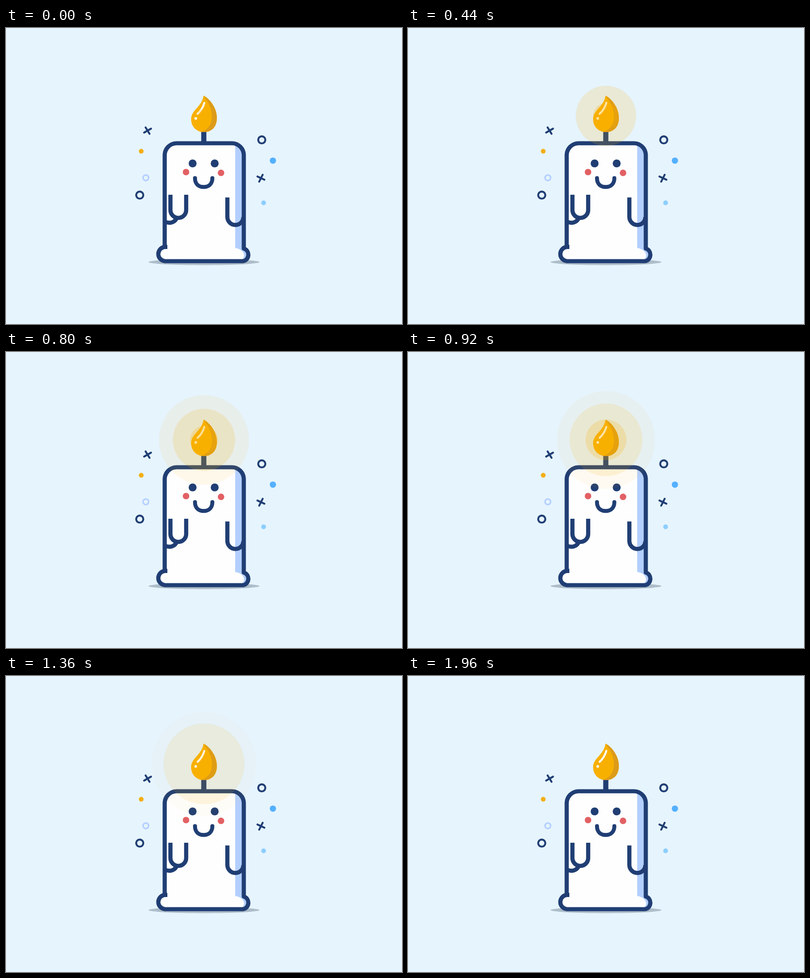
Animation of 800 by 600 pixels, one loop 2040 ms. Source, as an HTML page:

```html
<!DOCTYPE html>
<html lang="en">
<head>
<meta charset="utf-8">
<title>Candle</title>
<style>
  html, body { margin: 0; width: 100%; height: 100%; overflow: hidden; background: #e6f4fe; }
  svg { display: block; width: 100vw; height: 100vh; }
  .ink { fill: #203e74; }
  .line { fill: none; stroke: #203e74; stroke-width: 8.4; }
  .round { stroke-linecap: round; }
  .thin { stroke-width: 3.9; }
  .white { fill: #fefefe; }
  .shade { fill: #b3cfff; }
  .cheek { fill: #e26064; }

  .glow {
    fill: #f8b000;
    transform-origin: 400px 178px;
    transform: scale(0);
    opacity: 0;
    animation: grow 2040ms infinite backwards, fade 2040ms linear infinite backwards;
    animation-delay: var(--start);
  }
  /* Each ring lives for 1263 ms of the loop */
  @keyframes grow {
    0% { transform: scale(0); animation-timing-function: cubic-bezier(.333, .475, .667, .809); }
    61.9%, 100% { transform: scale(1); }
  }
  @keyframes fade {
    0% { opacity: .285; }
    61.9%, 100% { opacity: 0; }
  }
</style>
</head>
<body>
<svg viewBox="0 0 800 600">
  <ellipse cx="400" cy="474.5" rx="112" ry="6.2" fill="#adbdc9"/>

  <!-- sparkles -->
  <g class="line round thin">
    <path d="M279 212L293 204M282 201.5L290 214.5"/>
    <path d="M508 301L522 307.5M518.5 297.5L511.5 311.5"/>
    <circle cx="516.7" cy="226.7" r="7.2"/>
    <circle cx="270.2" cy="338.7" r="7.2"/>
  </g>
  <circle cx="282.5" cy="303.6" r="5.7" fill="none" stroke="#b3cfff" stroke-width="3"/>
  <circle cx="273.2" cy="249.8" r="4.8" fill="#f2ae12"/>
  <circle cx="539.2" cy="268.8" r="6.4" fill="#55b0ff"/>
  <circle cx="520.4" cy="354.4" r="4.8" fill="#8cceff"/>

  <!-- body -->
  <path class="white" d="M320.5 444V258A24 24 0 0 1 344.5 233.5H463V446C473 447 481 453 481 461C481 466 478 469 474 472.5H321A14.3 14.3 0 0 1 321 444Z"/>
  <path class="shade" d="M463 234C474 236 480 246 480 258V446C488 448 491 454 490.5 461C490 468 485 472 474 472C478 468 481 466 481 461C481 453 473 447 463 446Z"/>
  <path class="line" stroke-linejoin="round" d="M326 443.7H321A14.5 14.5 0 0 0 321 472.6H478.5A12 13 0 0 0 480.4 447V258A24 24.5 0 0 0 456 233.6H344.5A24 24.5 0 0 0 320.6 258V443.7"/>

  <!-- arms -->
  <path class="line" d="M321 392.5C331 397.5 341 394 345 385"/>
  <path class="line white" style="fill:#fefefe" d="M332.2 338V369a15.9 15.9 0 0 0 31.8 0V338"/>
  <path class="line" d="M447.2 343.5V383a16.2 16.2 0 0 0 32.4 0"/>

  <!-- face -->
  <circle class="ink" cx="377" cy="274.5" r="8"/>
  <circle class="ink" cx="421.6" cy="274.5" r="8"/>
  <circle class="cheek" cx="363.7" cy="292" r="6.6"/>
  <circle class="cheek" cx="434.4" cy="293.7" r="6.6"/>
  <path class="line round" style="stroke-width:8" d="M381.8 304.3C381.8 316 389 322.3 399.3 322.3C409.6 322.3 416.9 316 416.9 304.3"/>

  <!-- wick and flame -->
  <path class="ink" d="M394.4 205H404.8V232H394.4Z"/>
  <path fill="#f8b000" d="M399 137C412 144 426 162 426 182C426 201 415 211 400 211C385 211 374 200 374 185C374 166 396 160 399 137Z"/>
  <path fill="#dc9b18" d="M399 137C412 144 426 162 426 182C426 201 415 211 400 211L394 210.4C407 207 416 196 416 180C416 164 410 151 399 137Z"/>
  <path d="M400.7 151.8Q396.5 166 387 174" fill="none" stroke="#fff" stroke-width="4" stroke-linecap="round"/>
  <circle cx="383.3" cy="183.2" r="2.7" fill="#fff"/>

  <!-- glow rings -->
  <circle class="glow" cx="400" cy="178" r="112.3" style="--start:-113ms"/>
  <circle class="glow" cx="400" cy="178" r="112.3" style="--start:227ms"/>
  <circle class="glow" cx="400" cy="178" r="112.3" style="--start:567ms"/>
</svg>
</body>
</html>
```
